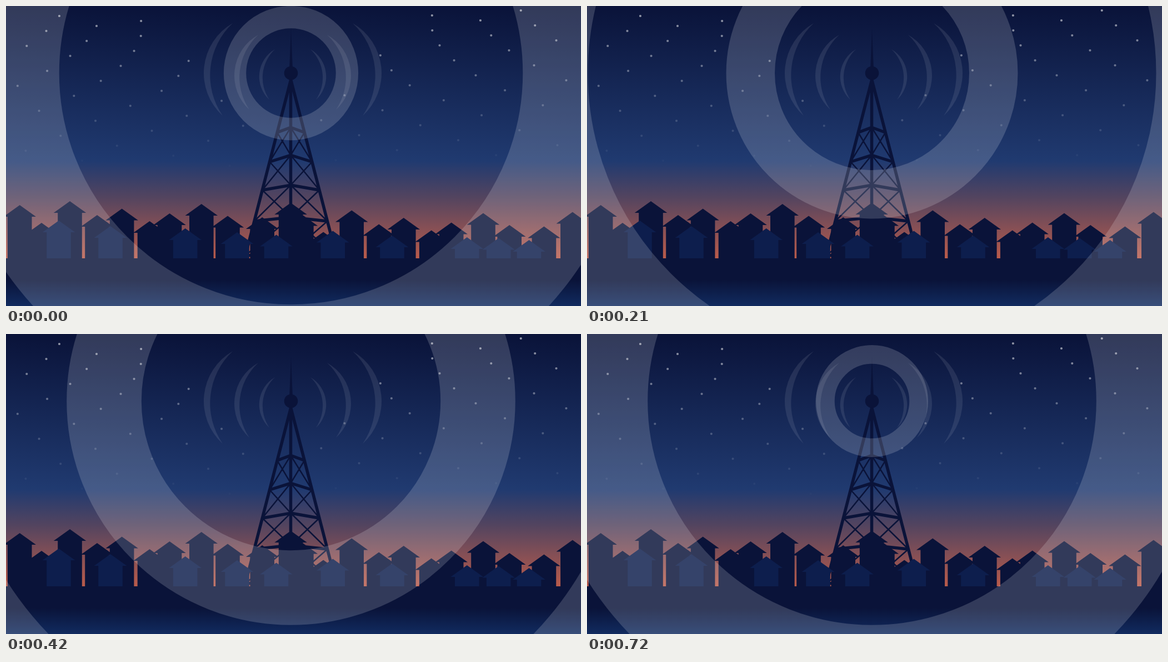
These frames come from a looping animation (1035x541 px, 0.75 s). An HTML page:

```html
<!DOCTYPE html>
<html lang="en">
<head>
<meta charset="utf-8">
<title>Radio tower at dusk</title>
<style>
  html, body { margin: 0; width: 100%; height: 100%; overflow: hidden; background: #0a1339; }
  svg { display: block; width: 100%; height: 100%; }
</style>
</head>
<body>
<svg viewBox="0 0 1035 541">
  <defs>
    <linearGradient id="sky" gradientUnits="userSpaceOnUse" x1="0" y1="0" x2="0" y2="455">
      <stop offset="0" stop-color="#0a1339"/>
      <stop offset=".615" stop-color="#203a70"/>
      <stop offset=".758" stop-color="#53445f"/>
      <stop offset="1" stop-color="#b95b4b"/>
    </linearGradient>
    <linearGradient id="ground" gradientUnits="userSpaceOnUse" x1="0" y1="494" x2="0" y2="541">
      <stop offset="0" stop-color="#0a1339"/>
      <stop offset="1" stop-color="#112b5f"/>
    </linearGradient>
  </defs>
  <rect width="1035" height="456" fill="url(#sky)"/>
  <g id="stars" fill="#fff"></g>
  <path id="waves" fill="#fff" fill-opacity=".09"/>
  <g fill="none" stroke="#0a1339">
    <path id="frame" stroke-width="5.5"/>
    <path id="braces" stroke-width="2.5"/>
  </g>
  <path d="M513 42L516 115H510Z" fill="#0a1339"/>
  <circle cx="513" cy="121" r="12.3" fill="#0a1339"/>
  <path id="backHouses" fill="#0a1339"/>
  <path id="frontHouses" fill="#0d1e4d"/>
  <rect y="455" width="1035" height="86" fill="url(#ground)"/>
  <g fill="none" stroke="#fff" stroke-opacity=".165">
    <circle class="ring" cx="513" cy="121"/>
    <circle class="ring" cx="513" cy="121"/>
  </g>
</svg>
<script>
const byId = id => document.getElementById(id);
const setPath = (id, d) => byId(id).setAttribute('d', d);

// Golden-ratio scatter that widens and fades towards the horizon,
// repeated on the right as a stretched mirror image.
const star = (x, y) =>
  `<circle cx="${x}" cy="${y}" r="2.1" opacity="${Math.max(.02, .58 * (1 - y / 292))}"/>`;
let stars = '';
for (let i = 0; i < 31; i++) {
  const y = 18 + 9 * i;
  const x = 20 + (i * .618 + .35) % 1 * Math.min(430, 190 + 1.5 * y);
  stars += star(x, y) + star(1031 - 1.0864 * x, y - 10);
}
byId('stars').innerHTML = stars;

// Crescents mirrored about x = 516: distance and height of both tips, outer radius.
const crescents = [[108, 31, 126, 198, 104], [62, 52, 78, 187, 84], [32, 78, 42, 169, 57]];
setPath('waves', crescents.flatMap(([dx1, y1, dx2, y2, r]) => [-1, 1].map(side => {
  const sweep = side < 0 ? 0 : 1, inner = r * 1.24;
  return `M${516 + side * dx1} ${y1}A${r} ${r} 0 0 ${sweep} ${516 + side * dx2} ${y2}` +
         `A${inner} ${inner} 0 0 ${1 - sweep} ${516 + side * dx1} ${y1}Z`;
})).join(''));

// Tower: each level has a height at the legs and one at the central mast.
const levels = [[228, 219], [281, 269], [332, 323], [388, 381], [450, 446]];
const leg = (y, side) => `${512.7 + side * .258 * (y - 133)} ${y}`;
let frame = 'M512.5 128V450', braces = '';
for (const side of [-1, 1]) {
  frame += `M${leg(130, side)}L${leg(450, side)}`;
  levels.forEach(([legY, mastY], i) => {
    frame += `M${leg(legY, side)}L512.5 ${mastY}`;
    if (i === 0) return;
    const [upperLegY, upperMastY] = levels[i - 1];
    braces += `M512.5 ${upperMastY}L${leg(legY, side)}M${leg(upperLegY, side)}L512.5 ${mastY}`;
  });
}
setPath('frame', frame);
setPath('braces', braces);

// Houses share one shape, placed by the roof's peak.
const house = ([x, y]) =>
  `M${x} ${y}L${x + 29.3} ${y + 21}H${x + 21.8}V455.5H${x - 21.8}V${y + 21}H${x - 29.3}Z`;
const street = [
  [24.7, 359], [64, 391], [115, 352], [164, 377], [208.6, 365.5], [258.5, 388],
  [294.5, 374], [351.8, 357], [399, 378.5], [461.2, 381], [512.6, 355]
];
const nextStreet = street.map(([x, y]) => [x + 507.2, y + 16.5]);
setPath('backHouses', [...street, ...nextStreet].map(house).join(''));
setPath('frontHouses', [
  [95, 387], [188, 397], [322.7, 401], [416, 408], [486.5, 412.5],
  [588.3, 405.5], [695, 414], [829.8, 417], [886.7, 418.5], [941.5, 422]
].map(house).join(''));

// A new ring leaves the ball every loop; each one lives for two loops.
const STEP = 30, STEPS = 25, GROWTH = 20.19;
const rings = document.querySelectorAll('.ring');
const start = performance.now();

function draw(now) {
  const step = Math.floor(Math.max(0, now - start) / STEP) % STEPS;
  rings.forEach((ring, i) => {
    const radius = GROWTH * ((step + 6) % STEPS + i * STEPS);
    ring.setAttribute('r', radius * 5 / 6);
    ring.setAttribute('stroke-width', radius / 3);
  });
  requestAnimationFrame(draw);
}
draw(start);
</script>
</body>
</html>
```
